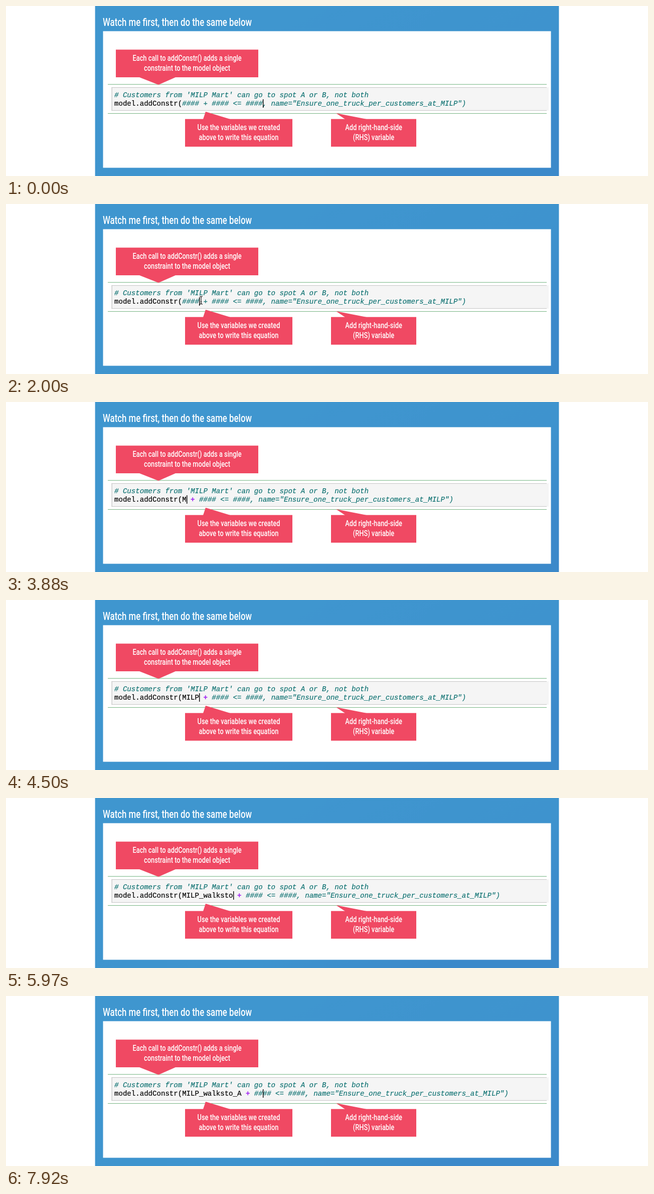
Animation, 1280 px wide and 341 px high, one loop 7.99 s. Source, as an HTML page with a canvas:

```html
<!DOCTYPE html>
<html lang="en">
<head>
<meta charset="utf-8">
<title>Constraint walkthrough</title>
<style>
html, body { margin: 0; width: 100%; height: 100%; overflow: hidden; background: #fff; }
canvas { display: block; }
</style>
</head>
<body>
<canvas id="stage" width="1280" height="341"></canvas>
<script>
const ctx = document.getElementById("stage").getContext("2d");
const LOOP = 7990;
const PINK = "#f04963", TEAL = "#0f7272";
const MONO = "'Liberation Mono', 'Courier New', monospace";
const CHAR = 8.45, CODE_X = 216, CONDENSED = 0.765;
const CALL = "model.addConstr(";
const TAIL = ' + #### <= ####, name="Ensure_one_truck_per_customers_at_MILP")';

// Each edit: time, first argument, caret column after the opening bracket
const edits = [[-230, "####", 19], [1480, "####", 4]];
[2180, 2400, 2590].forEach((t, i) => edits.push([t, "#".repeat(3 - i), 3 - i]));
edits.push([3330, "", 0]);
const word = "MILP_walksto_A";
[3600, 4000, 4170, 4360, 4580, 4790, 4980, 5110, 5320, 5530, 5740, 5950, 6210, 6480]
  .forEach((t, i) => edits.push([t, word.slice(0, i + 1), i + 1]));
[7040, 7250, 7450, 7650, 7850].forEach((t, i) => edits.push([t, word, 15 + i]));

function rect(x, y, w, h, fill) {
  ctx.fillStyle = fill;
  ctx.fillRect(x, y, w, h);
}

function poly(points, fill) {
  ctx.fillStyle = fill;
  ctx.beginPath();
  points.forEach(([x, y]) => ctx.lineTo(x, y));
  ctx.fill();
}

function label(text, x, y, size, align) {
  ctx.save();
  ctx.translate(x, y);
  ctx.scale(CONDENSED, 1);
  ctx.font = `500 ${size}px Roboto, sans-serif`;
  ctx.textAlign = align;
  ctx.fillStyle = "#fff";
  ctx.fillText(text, 0, 0);
  ctx.restore();
}

function callout(x, y, w, h, tail, lines) {
  rect(x, y, w, h, PINK);
  poly(tail, PINK);
  lines.forEach((s, i) => label(s, x + w / 2, y + 22 + i * 20, 16.8, "center"));
}

function code(text, col, y, color, style = "") {
  ctx.font = `${style} ${CHAR / 0.6001}px ${MONO}`;
  ctx.textAlign = "left";
  ctx.fillStyle = ctx.strokeStyle = color;
  ctx.lineWidth = 0.2;
  ctx.fillText(text, CODE_X + col * CHAR, y);
  ctx.strokeText(text, CODE_X + col * CHAR, y);
}

function drawPanel() {
  rect(0, 0, 1280, 341, "#fff");
  const blue = ctx.createLinearGradient(560, 0, 760, 400);
  blue.addColorStop(0, "#3f96cf");
  blue.addColorStop(0.6, "#3e93ce");
  blue.addColorStop(1, "#3b89ca");
  rect(177.6, 0, 924.8, 341, blue);
  rect(193.5, 50.5, 893, 274, "#fff");
  label("Watch me first, then do the same below", 193, 39.5, 22, "left");

  rect(203, 156.7, 875, 1.1, "#7cb889");
  rect(203, 215, 875, 1.1, "#7cb889");
  rect(210.5, 163, 871.5, 47, "#f5f5f5");
  rect(210.5, 163, 867.5, 1, "#c4c4c4");
  rect(210.5, 209, 867.5, 1, "#c4c4c4");
  rect(210.5, 163, 1.2, 47, "#c4c4c4");

  callout(219, 87.5, 284, 55.5, [[266, 143], [338, 143], [304, 158]],
    ["Each call to addConstr() adds a single", "constraint to the model object"]);
  callout(357, 226.7, 214, 55.5, [[393, 227], [398, 212], [447, 227]],
    ["Use the variables we created", "above to write this equation"]);
  callout(648, 226.7, 170, 55.5, [[676, 227], [658, 215], [719, 227]],
    ["Add right-hand-side", "(RHS) variable"]);
}

function drawCode(t) {
  const [since, arg, caret] = edits.filter(e => e[0] <= t).pop();
  const line = CALL + arg + TAIL;
  const hash = line.indexOf("#");
  code("# Customers from 'MILP Mart' can go to spot A or B, not both", 0, 183, TEAL, "italic");
  code(line.slice(0, hash).replace("+", " "), 0, 200, "#000");
  const plus = line.indexOf("+");
  if (plus < hash) code("+", plus, 200, "#a32cf2", "bold");
  code(line.slice(hash), hash, 200, TEAL, "italic");

  if ((t - since) % 1060 < 530) {
    rect(Math.round(CODE_X + (CALL.length + caret) * CHAR), 187, 1.4, 17, "#000");
  }
}

function drawPointer(t) {
  if (t < 760 || t >= 2180) return;
  const p = Math.min(1, (t - 760) / 240);
  const rest = (1 - p) ** 3;
  const x = 389 + 90 * rest, y = 193 + 14 * rest;
  ctx.beginPath();
  for (const s of [-1, 1]) {
    ctx.moveTo(x - 3, y + s * 8);
    ctx.quadraticCurveTo(x, y + s * 8, x, y + s * 5.5);
    ctx.quadraticCurveTo(x, y + s * 8, x + 3, y + s * 8);
  }
  ctx.moveTo(x, y - 6);
  ctx.lineTo(x, y + 6);
  ctx.moveTo(x - 1.5, y + 3);
  ctx.lineTo(x + 1.5, y + 3);
  ctx.strokeStyle = "#222";
  ctx.lineWidth = 1.2;
  ctx.stroke();
}

const start = performance.now();
function frame() {
  const t = Math.max(0, performance.now() - start) % LOOP;
  drawPanel();
  drawCode(t);
  drawPointer(t);
  requestAnimationFrame(frame);
}
frame();
</script>
</body>
</html>
```
